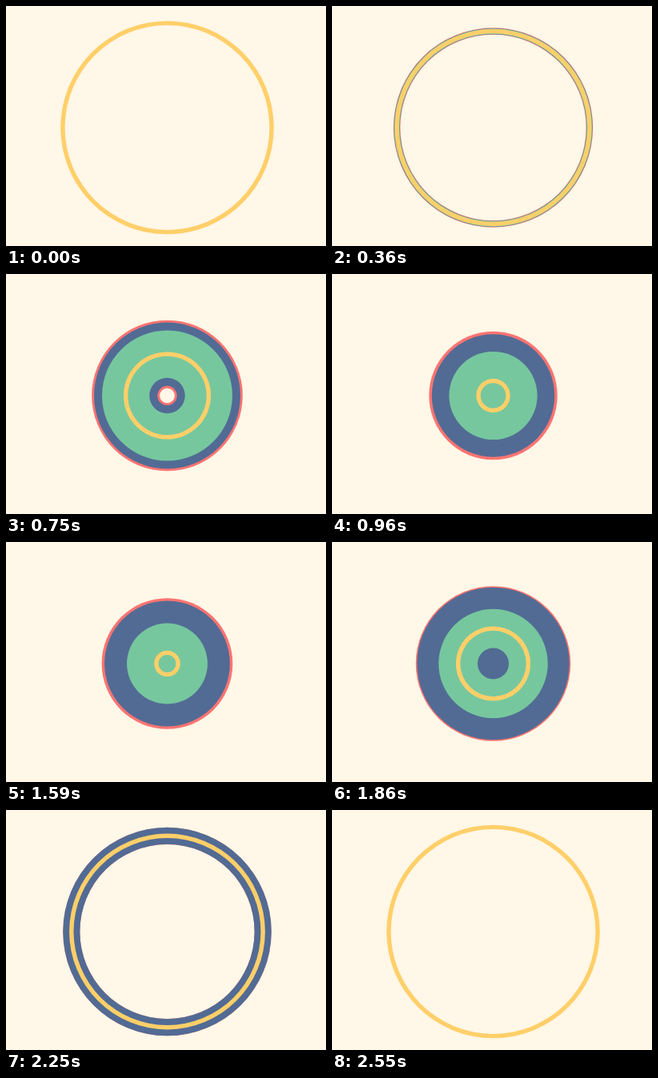
Animation of 400x300 px, one loop 2.79 s. Source, as an HTML page with a canvas:

```html
<!DOCTYPE html>
<html lang="en">
<head>
<meta charset="utf-8">
<title>Rings</title>
<style>
  html, body { margin: 0; width: 100%; height: 100%; overflow: hidden; background: #fff7e7; }
  canvas { display: block; }
</style>
</head>
<body>
<canvas id="stage" width="400" height="300"></canvas>
<script>
const ctx = document.getElementById('stage').getContext('2d');
const LOOP = 2790, STEP = 30;
const CLOSE_AT = 210, OPEN_AT = 1560;
const CX = 201.5, CY = 152;
const BIG = 130.6, SMALL = 13, LINE = 5.4;

// Progress of each part at these times (ms) after a move begins.
const TIMES = [0, 150, 390, 510, 750, 990];
const RADIUS = [0, 0.0865, 0.398, 0.62, 0.953, 1];
const BANDS = [
  { color: '#fc7472', width: 137, ease: [0, 0.062, 0.361, 0.573, 0.901, 1] },
  { color: '#526b94', width: 130, ease: [0, 0.056, 0.338, 0.5615, 0.895, 1] },
  { color: '#76c79e', width: 74, ease: [0, 0.09, 0.527, 0.761, 0.989, 1] }
];

// Monotone cubic curve through the eased values.
function curve(values, t) {
  const last = TIMES.length - 1;
  if (t <= 0) return values[0];
  if (t >= TIMES[last]) return values[last];
  const slope = i => (values[i + 1] - values[i]) / (TIMES[i + 1] - TIMES[i]);
  const tangent = i => {
    if (i === 0 || i === last) return 0;
    const a = slope(i - 1), b = slope(i);
    return 2 * a * b / (a + b);
  };
  let i = 0;
  while (t >= TIMES[i + 1]) i++;
  const h = TIMES[i + 1] - TIMES[i];
  const u = (t - TIMES[i]) / h, v = 1 - u;
  return values[i] * (1 + 2 * u) * v * v + tangent(i) * h * u * v * v
    + values[i + 1] * u * u * (3 - 2 * u) - tangent(i + 1) * h * u * u * v;
}

// 0 when fully open, 1 when fully closed.
function closed(values, t) {
  return t < OPEN_AT ? curve(values, t - CLOSE_AT) : 1 - curve(values, t - OPEN_AT);
}

function ring(color, radius, width) {
  if (width <= 0) return;
  const inner = radius - width / 2;
  ctx.beginPath();
  ctx.arc(CX, CY, radius + width / 2, 0, 2 * Math.PI);
  if (inner > 0) {
    ctx.closePath();
    ctx.moveTo(CX + inner, CY);
    ctx.arc(CX, CY, inner, 0, 2 * Math.PI);
  }
  ctx.fillStyle = color;
  ctx.fill('evenodd');
}

function draw(t) {
  ctx.fillStyle = '#fff7e7';
  ctx.fillRect(0, 0, 400, 300);
  const radius = BIG + (SMALL - BIG) * closed(RADIUS, t);
  for (const { color, width, ease } of BANDS) {
    const w = width * closed(ease, t);
    if (w > LINE) ring(color, radius, w);
  }
  ring('#ffcf69', radius, LINE);
}

const start = performance.now();
function tick() {
  const t = (performance.now() - start) % LOOP;
  draw(Math.floor(t / STEP) * STEP);
  requestAnimationFrame(tick);
}
tick();
</script>
</body>
</html>
```
